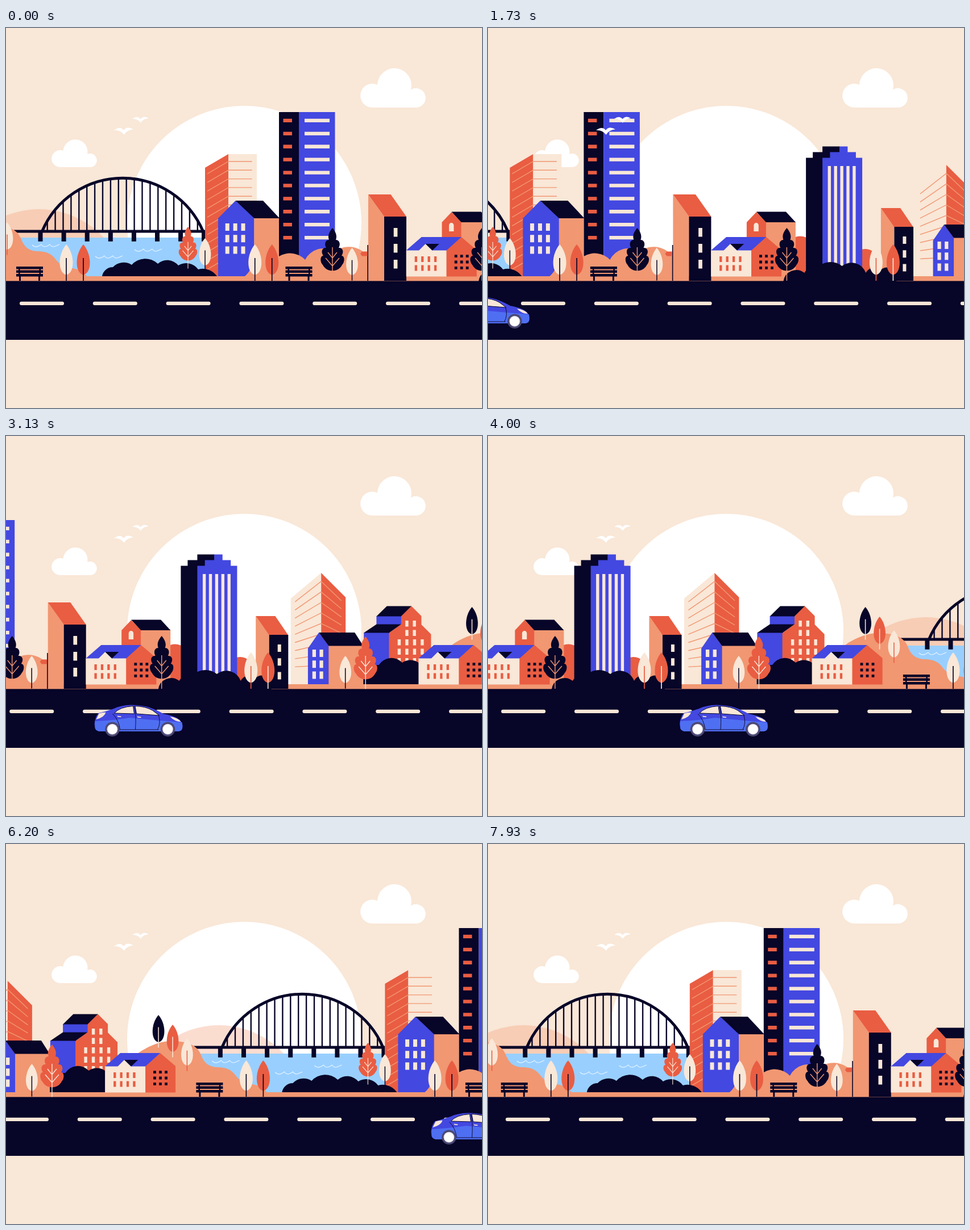
Recreate the animation shown at these times as an HTML page. Size 837x669 px, loop 7.99 s.

```html
<!DOCTYPE html>
<html lang="en">
<head>
<meta charset="utf-8">
<title>City drive</title>
<style>
  html, body { margin: 0; width: 100%; height: 100%; overflow: hidden; background: #f9e7d7; }
  svg { display: block; width: 100vw; height: 100vh; }
</style>
</head>
<body>
<svg viewBox="0 0 837 669">
  <defs>
    <g id="leaf" stroke-width="1.7">
      <path stroke="none" d="M0 0C8 9 11.5 22 11.5 32C11.5 44 7 52 0 53.5C-7 52 -11.5 44 -11.5 32C-11.5 22 -8 9 0 0Z"/>
      <path fill="none" d="M0 24V64"/>
    </g>
    <g id="oak" stroke-width="1.4">
      <path stroke="none" d="M0 0C5 6 9 13 6 21C12 21 15 28 11 35C18 34 21 42 16 49C22 49 22 60 17 65C13 73 5 76 0 75C-5 76 -13 73 -17 65C-22 60 -22 49 -16 49C-21 42 -18 34 -11 35C-15 28 -12 21 -6 21C-9 13 -5 6 0 0Z"/>
      <path fill="none" d="M0 34V93M-8 43L0 53L8 43M-12 53L0 67L12 53"/>
    </g>
    <path id="bench" fill="#070528" d="M0 420H47V424.500H0ZM0 426.500H47V431H0ZM0 433H47V437.500H0ZM4 424H6.500V434H4ZM40.500 424H43V434H40.500ZM5 437H8V445H5ZM39 437H42V445H39Z"/>
    <path id="wave" fill="none" stroke="#e8f5ff" stroke-width="1.1" d="M0 0Q5 5 11 2Q14 1 16 -1Q20 5 26 2Q29 1 31 -1Q35 5 41 2Q46 0 48 -1"/>
    <g id="wheel">
      <circle r="12.800" fill="#4b4872"/>
      <circle r="9.500" fill="#c9c6dc"/>
      <circle r="8.500" fill="#fff"/>
    </g>
  </defs>

  <circle cx="419" cy="343" r="206" fill="#fff"/>
  <g fill="#fff">
    <path d="M645 140A21 21 0 1 1 653 100A30 30 0 1 1 712 108.500A17 17 0 1 1 721 140Z"/>
    <path d="M95 245A15 15 0 1 1 100.500 216A21.500 21.500 0 1 1 143 222A12 12 0 1 1 148 245Z"/>
  </g>

  <rect y="437" width="837" height="9" fill="#f19772"/>
  <g id="scroll"><g id="city"></g><use href="#city" x="1431"/></g>

  <g fill="#fff">
    <path d="M190 180Q201 172 207 180Q213 172 224 178.500Q213 179 207.500 188Q201 179 190 180Z"/>
    <path d="M222 160Q231 153.500 236.500 160.500Q242 153.500 251 159Q241 159.500 237 167Q232 159.500 222 160Z"/>
  </g>

  <rect y="445.400" width="837" height="103.600" fill="#070528"/>
  <g id="dashes" fill="#f9e7d7"></g>

  <g id="car">
    <path fill="#4348e0" d="M0 507Q1 495 7 488Q20 485 34 480Q46 474 65 473.500Q86 474 97 478Q111 483 121 489Q139 492 149 499Q155 504 155 513Q154 519 148 520H8Q1 518 1 513Z"/>
    <path fill="#4f6ff2" d="M1 502Q32 501 62 496Q110 501 154 504Q156 513 153 518L148 520H8Q1 518 1 513Z"/>
    <path fill="#f9e7d7" stroke="#070528" d="M35 488Q44 477 68 475.500L70 489ZM71.500 475.500Q90 476 102 483L114 492L74 489Z"/>
    <path fill="#f9e7d7" d="M3 499L8 488.500Q14 486.500 20 486.500Q18 495 3 499ZM133 494Q147 496 152 503Q141 503 133 494ZM40 492.500L47 493.500V495L41 494.500ZM75 493.500L82 494.500V496L76 495.500Z"/>
    <path fill="none" stroke="#070528" stroke-width=".9" d="M70 475Q74 490 72 517M32 489Q43 500 45 517H113M113 492Q117 506 111 517"/>
    <use href="#wheel" x="31.500" y="516.300"/>
    <use href="#wheel" x="129" y="516.300"/>
  </g>
</svg>
<script>
const NAVY = '#070528', BLUE = '#4348e0', RED = '#e95d42', ORANGE = '#f19772',
      CREAM = '#f9e7d7', WATER = '#99cfff';

const el = id => document.getElementById(id);
const list = (n, start, gap) => Array.from({ length: n }, (_, i) => start + gap * i);
const shape = (fill, d, alpha = 1) => `<path fill="${fill}" fill-opacity="${alpha}" d="${d}"/>`;
const line = (color, width, d) => `<path fill="none" stroke="${color}" stroke-width="${width}" d="${d}"/>`;
const box = (fill, x, y, w, h) => shape(fill, `M${x} ${y}h${w}v${h}h${-w}Z`);
const grid = (fill, xs, ys, w, h) =>
  shape(fill, ys.flatMap(y => xs.map(x => `M${x} ${y}h${w}v${h}h${-w}Z`)).join(''));
const plant = (kind, x, y, fill, stroke, scale = 1) =>
  `<use href="#${kind}" fill="${fill}" stroke="${stroke}" transform="translate(${x} ${y}) scale(${scale})"/>`;
const put = (id, x, y = 0) => `<use href="#${id}" x="${x}" y="${y}"/>`;
// Rounded bumps: each entry is radius, end x, end y.
const bumps = (...arcs) => arcs.map(([r, x, y]) => `A${r} ${r} 0 0 1 ${x} ${y}`).join('');

function bridge() {
  const r = 153.6, cx = 205, cy = 263 + r;
  const hangers = list(20, 72.7, 13.9)
    .map(x => `M${x} ${cy - Math.sqrt(r * r - (x - cx) ** 2)}V357`).join('');
  return line(NAVY, 2.4, hangers) +
    line(NAVY, 5, `M63.500 358A${r} ${r} 0 0 1 346.500 358`) +
    box(NAVY, 14, 355.5, 336, 5) +
    grid(NAVY, list(7, 56.5, 41.1), [360], 8, 15.7) + box(NAVY, 344, 360, 6, 15.7);
}

function stripedBlock() {
  const rows = list(12, 235, 15.3);
  return shape(RED, 'M350 246L391 222V437H350Z') + box(CREAM, 391, 222, 50, 215) +
    line(ORANGE, 1.4, rows.map(y => `M354 ${y + 21.6}L391 ${y}H432.500`).join(''));
}

function cottage(x) {
  return `<g transform="translate(${x})">` +
    box(CREAM, 0, 391, 71, 46.5) +
    shape(RED, 'M71 391L97 368L124 391V437.500H71Z') +
    shape(BLUE, 'M0 391.500L27 368H97L71 391.500Z') +
    shape(CREAM, 'M22 392L34 380L46 392Z') +
    shape(NAVY, 'M34 380H58L46 391.500Z') +
    grid(RED, list(4, 15, 11.4), [402, 417.5], 4.3, 10) +
    grid(NAVY, list(3, 85, 10), list(3, 399.3, 10.3), 4.8, 4.8) + '</g>';
}

function perspectiveBlock() {
  const left = list(9, 292, 14.3), corner = list(9, 256, 18.5);
  return shape(CREAM, 'M1064 286L1117.500 241V437H1064Z') +
    shape(RED, 'M1117.500 241L1160.500 284V437H1117.500Z') +
    line(ORANGE, 1.4, left.map((y, i) => `M1071.500 ${y}L1117.500 ${corner[i]}L1153 ${y - 2}`).join(''));
}

el('city').innerHTML = [
  // river and hills
  shape(ORANGE, 'M-92.500 437A155 155 0 0 1 208.500 437Z', .33),
  box(WATER, 0, 369, 372, 68),
  bridge(),
  put('wave', 46, 382), put('wave', 157, 402), put('wave', 226, 390),
  shape(ORANGE, 'M-130 445Q-110 385 -81 366C-68 357 -45 347 -28 347C0 347 18 352 26 370C32 386 40 392 55 393C72 393 80 398 87 407C96 419 104 421 117 423C130 425 137 431 142 437V445Z'),
  plant('leaf', -48.3, 301, NAVY, CREAM, .9),
  plant('leaf', -23.3, 318, RED, CREAM, .9),
  plant('leaf', 2, 342, CREAM, RED, .9),
  cottage(-142.3),
  put('bench', 18),
  plant('leaf', 106, 381, CREAM, NAVY),
  plant('leaf', 136, 381, RED, NAVY),

  // striped block, blue house, tower
  stripedBlock(),
  shape(NAVY, 'M169 437' + bumps([19, 188, 421], [26, 221, 417], [32, 267, 415], [25, 303, 418], [26, 338, 425], [30, 371, 437]) + 'Z'),
  plant('oak', 320, 350, RED, CREAM, .79),
  shape(NAVY, 'M480 148H515V437H480Z'), box(BLUE, 515, 148, 63.5, 289),
  grid(RED, [487.5], list(10, 159.8, 22.9), 15.5, 6.3),
  grid(CREAM, [525], list(10, 159.8, 22.9), 44, 6.3),
  shape(BLUE, 'M373 335L403.500 304L436.500 334V437H373Z'),
  box(ORANGE, 436.5, 334, 43.5, 103),
  shape(NAVY, 'M403.500 304H452L481 335H436.500Z'),
  grid(CREAM, list(3, 385.7, 13.9), list(3, 344, 20.2), 7, 13),
  shape(ORANGE, 'M420 437Q434 425 437 400H480V402' + bumps([37, 526, 408], [36, 578, 394], [40, 640, 410]) + 'V446H420Z'),
  plant('leaf', 350, 370, CREAM, NAVY, .9),
  plant('leaf', 437.7, 381, CREAM, NAVY),
  plant('leaf', 467.7, 381, RED, NAVY),
  put('bench', 491.5),
  plant('oak', 574, 352, NAVY, ORANGE),
  plant('leaf', 608.5, 387, CREAM, NAVY, .9),
  box(NAVY, 635.4, 382, 3, 63),
  shape(RED, 'M638.400 382H648L651 386L648 390H638.400ZM635.400 393.500H626L623 397.500L626 401.500H635.400Z'),

  // slanted block and gabled houses
  shape(ORANGE, 'M637 293L665 332V445H637Z'),
  shape(RED, 'M637 293H676.500L704 332H665Z'),
  box(NAVY, 665, 332, 39, 113),
  grid(CREAM, [681.7], list(3, 352, 28), 6.7, 15.5),
  shape(RED, 'M852 437V368Q878 360 886 395V437Z'),
  shape(RED, 'M766.500 342L783.500 324L801 342V437H766.500Z'),
  box(ORANGE, 800.5, 341, 52, 96),
  shape(NAVY, 'M783.500 323.500H835.500L852.500 342H800.500Z'),
  shape(CREAM, 'M779 358V347.500A4.200 4.500 0 0 1 787.400 347.500V358Z'),
  cottage(703.7),

  // stepped skyscraper
  shape(RED, 'M952 437V412A23 23 0 0 1 998 412V437Z'),
  shape(NAVY, 'M870.700 445V228.500H882.700V218.500H899.700V208.500H930V445Z'),
  shape(BLUE, 'M899.700 437V228.500H913V218.500H929.500V208.500H944V218.500H958.500V228.500H969.700V437Z'),
  grid(CREAM, list(5, 909.2, 10.9), [243], 5.4, 180),
  shape(ORANGE, 'M1002.500 317L1026 350V445H1002.500Z'),
  shape(RED, 'M1002.500 317H1036.700L1059.500 350.500H1026Z'),
  box(NAVY, 1026, 350, 33.6, 95),
  grid(CREAM, [1041], list(3, 367, 24.3), 6, 13),
  shape(NAVY, 'M831 446' + bumps([23, 868, 431], [24, 894, 419], [32, 934, 419], [27, 976, 431], [18, 1003, 425], [18, 1030, 432]) + 'V446Z'),
  plant('oak', 837, 352, NAVY, ORANGE),
  plant('leaf', 994, 381, CREAM, RED),
  plant('leaf', 1024, 381, RED, CREAM),

  // perspective block, small house, terraced block
  perspectiveBlock(),
  shape(BLUE, 'M1094.200 374L1113.500 346L1131 370V437H1094.200Z'),
  box(ORANGE, 1130.700, 368, 60.5, 77),
  shape(NAVY, 'M1113.500 346H1176.500L1191.500 369.500H1130.700Z'),
  grid(CREAM, [1102, 1114.7], list(3, 376, 19.3), 6.3, 13),
  box(BLUE, 1192.5, 346, 46, 91),
  box(BLUE, 1214.7, 317, 44, 15),
  shape(RED, 'M1275.700 299L1293.700 317V332L1310.700 349V437H1236.700V347L1258.200 331V317Z'),
  shape(NAVY, 'M1214.700 317.500L1233 299.500H1276L1258 317.500ZM1192.500 346.500L1214.700 331.500H1258L1237 346.500Z'),
  grid(CREAM, [1265.5, 1278.7], [325, 341.5], 5.4, 10.5),
  grid(CREAM, list(4, 1252, 13.5), [358, 374.5, 391], 5.4, 10.5),
  shape(NAVY, 'M1191.500 437V424' + bumps([26, 1219, 403], [26, 1260, 399], [25, 1290, 400]) + 'V437Z'),
  plant('leaf', 1160, 387, CREAM, NAVY, .9),
  plant('oak', 1195.5, 353, RED, CREAM)
].join('');

const DASH_GAP = 128.8;
el('dashes').innerHTML = list(8, 24, DASH_GAP)
  .map(x => `<rect x="${x}" y="481.700" width="78" height="6.200" rx="3"/>`).join('');

const LOOP = 7990, FPS = 15;
const slide = (id, x) => el(id).setAttribute('transform', `translate(${x.toFixed(2)})`);
const ease = p => p * p * (3 - 2 * p);

function draw(now) {
  const step = Math.min(119, Math.floor((now % LOOP + 3.4) * FPS / 1000));
  const drive = Math.min(1, Math.max(0, (step - 6.5) / 107));
  slide('scroll', -step * 11.985);
  slide('dashes', -(step * 8.6 % DASH_GAP));
  slide('car', -171 + 1016 * ease(drive));
  requestAnimationFrame(draw);
}
draw(performance.now());
</script>
</body>
</html>
```
